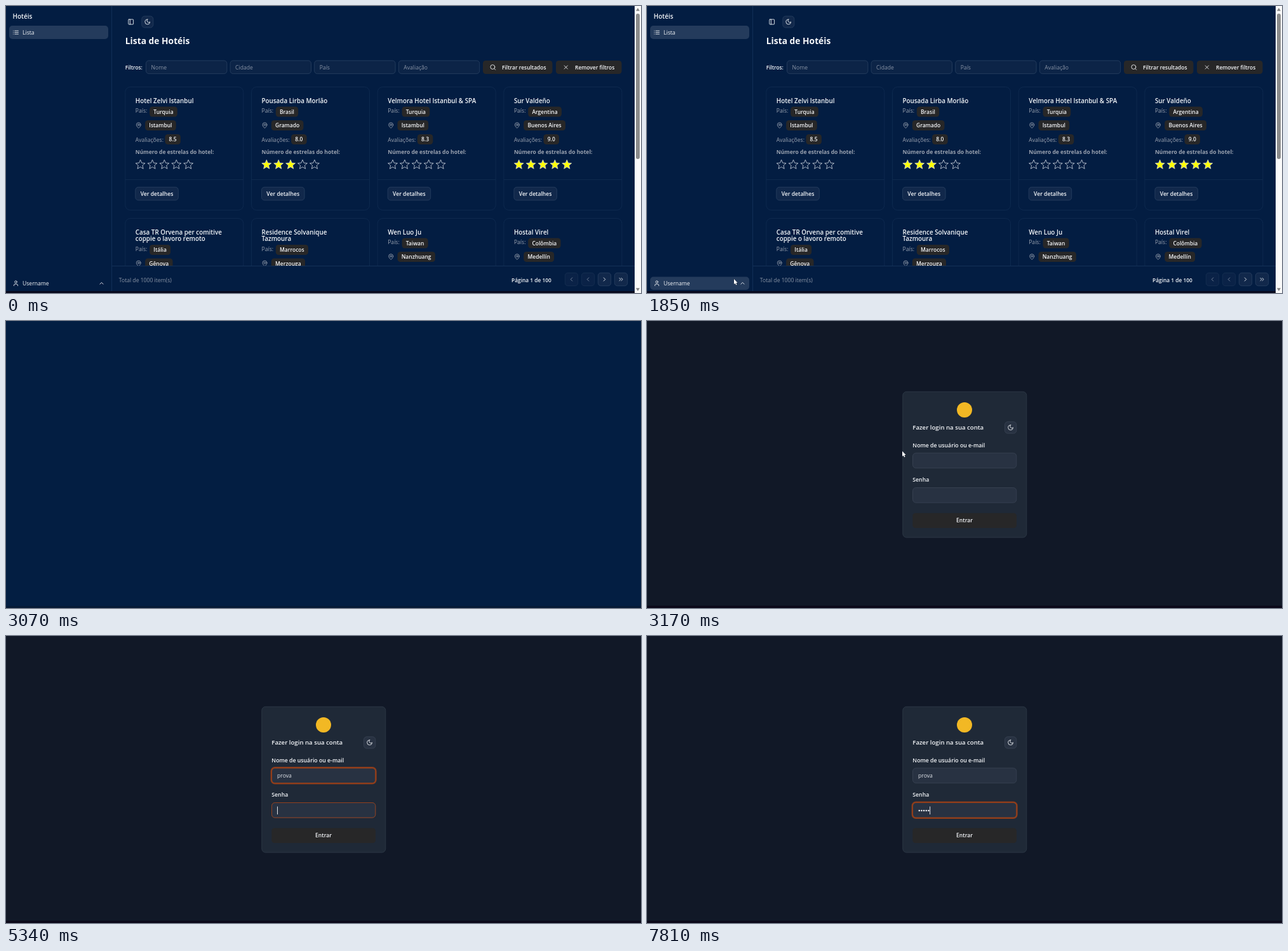
These frames come from a looping animation (1000x452 px, 8000 ms). An HTML page with a canvas:

```html
<!DOCTYPE html>
<html lang="pt-BR">
<head>
<meta charset="utf-8">
<title>Hotéis</title>
<style>
  html, body { margin: 0; width: 100%; height: 100%; overflow: hidden; background: #031d42; }
  canvas { display: block; width: 100%; height: 100%; }
</style>
</head>
<body>
<canvas></canvas>
<script>
const W = 1000, H = 452, LOOP = 8000;
const canvas = document.querySelector('canvas');
const ctx = canvas.getContext('2d');

const NAVY = '#031d42', LINE = '#112d52', EDGE = '#2a4262', SOFT = '#11284b';
const WHITE = '#f5f7fa', MUTED = '#9aa2b0', DARK = '#272728', RUST = '#9c4018';

const ICONS = {
  list: 'M8 6h13M8 12h13M8 18h13M3 6h.01M3 12h.01M3 18h.01',
  panel: 'M5 3h14a2 2 0 0 1 2 2v14a2 2 0 0 1-2 2H5a2 2 0 0 1-2-2V5a2 2 0 0 1 2-2ZM9 3v18',
  moon: 'M12 3a6 6 0 0 0 9 9 9 9 0 1 1-9-9Z',
  search: 'M19 11a8 8 0 1 1-16 0 8 8 0 0 1 16 0ZM21 21l-4.3-4.3',
  close: 'M18 6 6 18M6 6l12 12',
  left: 'm15 18-6-6 6-6',
  right: 'm9 18 6-6-6-6',
  last: 'm6 17 5-5-5-5M13 17l5-5-5-5',
  up: 'm18 15-6-6-6 6',
  user: 'M19 21v-2a4 4 0 0 0-4-4H9a4 4 0 0 0-4 4v2M16 7a4 4 0 1 1-8 0 4 4 0 0 1 8 0Z',
  pin: 'M20 10c0 6-8 12-8 12s-8-6-8-12a8 8 0 0 1 16 0ZM15 10a3 3 0 1 1-6 0 3 3 0 0 1 6 0Z'
};
for (const k in ICONS) ICONS[k] = new Path2D(ICONS[k]);

const HOTELS = [
  { name: ['Hotel Zelvi Istanbul'], land: 'Turquia', city: 'Istambul', score: '8.5', stars: 0 },
  { name: ['Pousada Lirba Morlão'], land: 'Brasil', city: 'Gramado', score: '8.0', stars: 3 },
  { name: ['Velmora Hotel Istanbul & SPA'], land: 'Turquia', city: 'Istambul', score: '8.3', stars: 0 },
  { name: ['Sur Valdeño'], land: 'Argentina', city: 'Buenos Aires', score: '9.0', stars: 5 },
  { name: ['Casa TR Orvena per comitive', 'coppie o lavoro remoto'], land: 'Itália', city: 'Gênova' },
  { name: ['Residence Solvanique', 'Tazmoura'], land: 'Marrocos', city: 'Merzouga' },
  { name: ['Wen Luo Ju'], land: 'Taiwan', city: 'Nanzhuang' },
  { name: ['Hostal Virel'], land: 'Colômbia', city: 'Medellín' }
];

const clamp = v => Math.max(0, Math.min(1, v));
const ramp = (t, a, b) => { const u = clamp((t - a) / (b - a)); return u * u * (3 - 2 * u); };

// y is the middle of the capitals
function text(s, x, y, size = 8.6, weight = 400, color = WHITE, align = 'left') {
  ctx.font = `${weight} ${size}px "Open Sans", "Noto Sans", sans-serif`;
  ctx.textAlign = align;
  ctx.fillStyle = color;
  ctx.fillText(s, x, y + size * 0.36);
  return ctx.measureText(s).width;
}

function box(x, y, w, h, r, fill, stroke, lw = 0.8) {
  ctx.beginPath();
  ctx.roundRect(x, y, w, h, r);
  if (fill) { ctx.fillStyle = fill; ctx.fill(); }
  if (stroke) { ctx.strokeStyle = stroke; ctx.lineWidth = lw; ctx.stroke(); }
}

function rect(x, y, w, h, color) {
  ctx.fillStyle = color;
  ctx.fillRect(x, y, w, h);
}

function icon(name, cx, cy, color = WHITE, size = 10.4) {
  ctx.save();
  ctx.translate(cx - size / 2, cy - size / 2);
  ctx.scale(size / 24, size / 24);
  ctx.lineWidth = 2;
  ctx.lineCap = ctx.lineJoin = 'round';
  ctx.strokeStyle = color;
  ctx.stroke(ICONS[name]);
  ctx.restore();
}

function chip(s, x, y) {
  ctx.font = '600 8.5px "Open Sans", "Noto Sans", sans-serif';
  box(x, y - 8, ctx.measureText(s).width + 12.5, 16, 4.5, DARK);
  text(s, x + 6.2, y, 8.5, 600);
}

function star(cx, cy, filled) {
  ctx.beginPath();
  for (let i = 0; i < 10; i++) {
    const r = i % 2 ? 3.5 : 7.8, a = Math.PI * (i / 5 - 0.5);
    ctx.lineTo(cx + r * Math.cos(a), cy + 0.5 + r * Math.sin(a));
  }
  ctx.closePath();
  if (filled) { ctx.fillStyle = '#ffff00'; ctx.fill(); }
  ctx.strokeStyle = '#d3d9e2';
  ctx.lineWidth = 0.8;
  ctx.lineJoin = 'round';
  ctx.stroke();
}

function card(h, i) {
  const x = 187.8 + 198.7 * (i % 4), top = i < 4 ? 127.5 : 334.5, tx = x + 16;
  box(x, top, 186, 194, 8, null, LINE);
  h.name.forEach((s, n) => text(s, tx, top + 21.8 + n * 10.5, 9.85, 600));
  const y = top + (h.name.length - 1) * 10.5;
  text('País:', tx, y + 37.5, 8.6, 400, MUTED);
  chip(h.land, tx + 22.3, y + 39);
  icon('pin', tx + 5, y + 60.5, MUTED);
  chip(h.city, tx + 15.3, y + 60.5);
  if (!h.score) return;
  text('Avaliações:', tx, y + 83, 8.6, 400, MUTED);
  chip(h.score, tx + 46.6, y + 82.5);
  text('Número de estrelas do hotel:', tx, y + 102.8, 8.55, 700, MUTED);
  for (let n = 0; n < 5; n++) star(tx + 7.8 + n * 18.9, y + 122, n < h.stars);
  rect(x, y + 145.5, 186, 0.8, LINE);
  box(tx, y + 157.8, 67.5, 20.6, 4.5, SOFT, EDGE);
  text('Ver detalhes', tx + 33.7, y + 168, 8.6, 600, WHITE, 'center');
}

function triangle(cx, cy, d) {
  ctx.beginPath();
  ctx.moveTo(cx - 3, cy + d);
  ctx.lineTo(cx + 3, cy + d);
  ctx.lineTo(cx, cy - d * 1.6);
  ctx.fillStyle = '#858585';
  ctx.fill();
}

function listPage(hover) {
  rect(0, 0, W, H, NAVY);

  text('Hotéis', 10.5, 16.3, 10, 600);
  box(5, 31, 156, 21, 5, '#243b5c');
  icon('list', 15.5, 41.6);
  text('Lista', 26, 42, 8.6, 500);
  if (hover) box(5, 426.5, 156, 20.5, 5, '#243b5c');
  icon('user', 15.5, 436.7);
  text('Username', 26, 437, 8.6);
  icon('up', 150.5, 436.7);
  rect(166, 0, 0.9, 449, '#14305a');

  icon('panel', 196.7, 25);
  box(213.8, 16, 18, 18, 4.5, SOFT, EDGE);
  icon('moon', 222.8, 25);
  text('Lista de Hotéis', 187.8, 55.5, 13.8, 700);

  text('Filtros:', 187.8, 96.8, 8.3, 600);
  ['Nome', 'Cidade', 'País', 'Avaliação'].forEach((s, i) => {
    const x = 220.5 + i * 132.6;
    box(x, 86, 127.4, 20.6, 4.5, '#0c2447', EDGE);
    text(s, x + 8, 97, 8.6, 400, '#8792a4');
  });
  box(751, 86, 109.5, 21, 4.5, DARK);
  icon('search', 766.8, 96.5);
  text('Filtrar resultados', 781, 96.8, 8.45, 600);
  box(866, 86, 103.5, 21, 4.5, DARK);
  icon('close', 881.8, 96.5);
  text('Remover filtros', 896, 96.8, 8.45, 600);

  ctx.save();
  ctx.beginPath();
  ctx.rect(167, 110, 823, 299);
  ctx.clip();
  HOTELS.forEach(card);
  ctx.restore();

  rect(167, 409, 823, 0.9, '#17335a');
  text('Total de 1000 item(s)', 177.8, 432, 8.6, 400, '#8a94a5');
  text('Página 1 de 100', 796, 431.7, 8.4, 600);
  ['left', 'left', 'right', 'last'].forEach((s, i) => {
    ctx.globalAlpha = i < 2 ? 0.5 : 1;
    box(880.3 + i * 26, 420.3, 20.4, 20.4, 4.5, SOFT, EDGE);
    icon(s, 890.5 + i * 26, 430.5);
  });
  ctx.globalAlpha = 1;

  rect(0, 449, 990, 3, '#07091d');
  rect(990, 0, 10, H, '#fafafa');
  box(992, 12, 6, 229, 3, '#8b8b8b');
  triangle(995, 6, 1.8);
  triangle(995, 446, -1.8);
}

function blankPage() {
  rect(0, 0, W, H, '#031e42');
  rect(0, 449, W, 3, '#061a35');
}

const USER = 'prova';
const USER_KEYS = [4630, 4650, 4830, 4930, 5030];
const PASS_KEYS = [6180, 6370, 6840, 7540, 7810];
const FOCUS = 3920, TAB = 5340;

const typed = (keys, t) => keys.filter(k => k <= t).length;

function caret(x, y, focusAt, keys, t) {
  const last = Math.max(focusAt, ...keys.filter(k => k <= t));
  if (Math.floor((t - last) / 510) % 2 === 0) rect(x, y - 6, 0.9, 12.5, WHITE);
}

function field(y, glow, focused) {
  box(418.5, y, 163.3, 23.6, 5, '#283242', '#3a4555');
  if (glow > 0) {
    ctx.globalAlpha = glow * 0.85;
    box(417.7, y - 0.8, 164.9, 25.2, 5.8, null, RUST, 2.2);
  }
  ctx.globalAlpha = focused ? 0.9 : glow;
  if (ctx.globalAlpha > 0) box(418.5, y, 163.3, 23.6, 5, null, RUST, 1);
  ctx.globalAlpha = 1;
}

function loginPage(t) {
  rect(0, 0, W, H, '#111827');
  rect(0, 448.5, W, 3.5, '#0b0819');
  box(402.8, 111.3, 195, 229.7, 6, '#1f2937', '#303b4a');

  ctx.beginPath();
  ctx.arc(500, 140, 12, 0, 7);
  ctx.fillStyle = '#f2b824';
  ctx.fill();

  text('Fazer login na sua conta', 418.3, 168, 9.65, 600);
  box(563.5, 158.7, 18.3, 18.3, 4.5, '#283242', '#3a4555');
  icon('moon', 572.6, 167.8);

  const inUser = t >= FOCUS && t < TAB, inPass = t >= TAB;
  text('Nome de usuário ou e-mail', 418.3, 195.5, 8.73, 600);
  field(208, ramp(t, FOCUS, 4030) - ramp(t, TAB, 5570), inUser);
  const w = text(USER.slice(0, typed(USER_KEYS, t)), 427, 220.3, 8.7, 400, '#dde1e7');
  if (inUser) caret(427.3 + w, 220, FOCUS, USER_KEYS, t);

  text('Senha', 418.3, 250, 8.73, 600);
  field(262.5, ramp(t, TAB, 5570), inPass);
  const dots = typed(PASS_KEYS, t);
  for (let i = 0; i < dots; i++) {
    ctx.beginPath();
    ctx.arc(428.8 + i * 3.65, 275, 1.2, 0, 7);
    ctx.fillStyle = WHITE;
    ctx.fill();
  }
  if (inPass) caret(427 + dots * 3.65, 274.5, TAB, PASS_KEYS, t);

  box(418.3, 302.5, 163.7, 23.5, 4.5, DARK);
  text('Entrar', 500, 314.3, 8.6, 600, WHITE, 'center');
}

// time, x, y
const PATH = [
  [360, 62, 24], [670, 97, 126], [1160, 112, 270], [1290, 112, 270], [1850, 137, 430],
  [2060, 137, 430], [2490, 118, 432], [2760, 118, 432], [3030, 250, 310],
  [3170, 402, 205], [3320, 402, 205], [3750, 468, 218], [4440, 468, 218]
];

function pointer(t) {
  const i = PATH.findIndex(p => p[0] > t);
  if (i < 1) return;
  const [a, b] = [PATH[i - 1], PATH[i]], u = (t - a[0]) / (b[0] - a[0]);
  ctx.save();
  ctx.translate(a[1] + (b[1] - a[1]) * u, a[2] + (b[2] - a[2]) * u);
  ctx.fill(POINTER);
  ctx.strokeStyle = '#0a1020';
  ctx.lineWidth = 0.6;
  ctx.stroke(POINTER);
  ctx.fillStyle = '#fff';
  ctx.fill(POINTER);
  ctx.restore();
}
const POINTER = new Path2D('M0 0V8.2L1.9 6.5 3.2 9.4 4.5 8.8 3.2 6H5.6Z');

function draw() {
  const t = performance.now() % LOOP;
  const w = Math.round(innerWidth * devicePixelRatio), h = Math.round(innerHeight * devicePixelRatio);
  if (canvas.width !== w || canvas.height !== h) { canvas.width = w; canvas.height = h; }
  ctx.setTransform(w / W, 0, 0, h / H, 0, 0);
  if (t < 3030) listPage(t >= 1780);
  else if (t < 3170) blankPage();
  else loginPage(t);
  if (t < 3030 || t >= 3170) pointer(t);
  requestAnimationFrame(draw);
}
draw();
</script>
</body>
</html>
```
